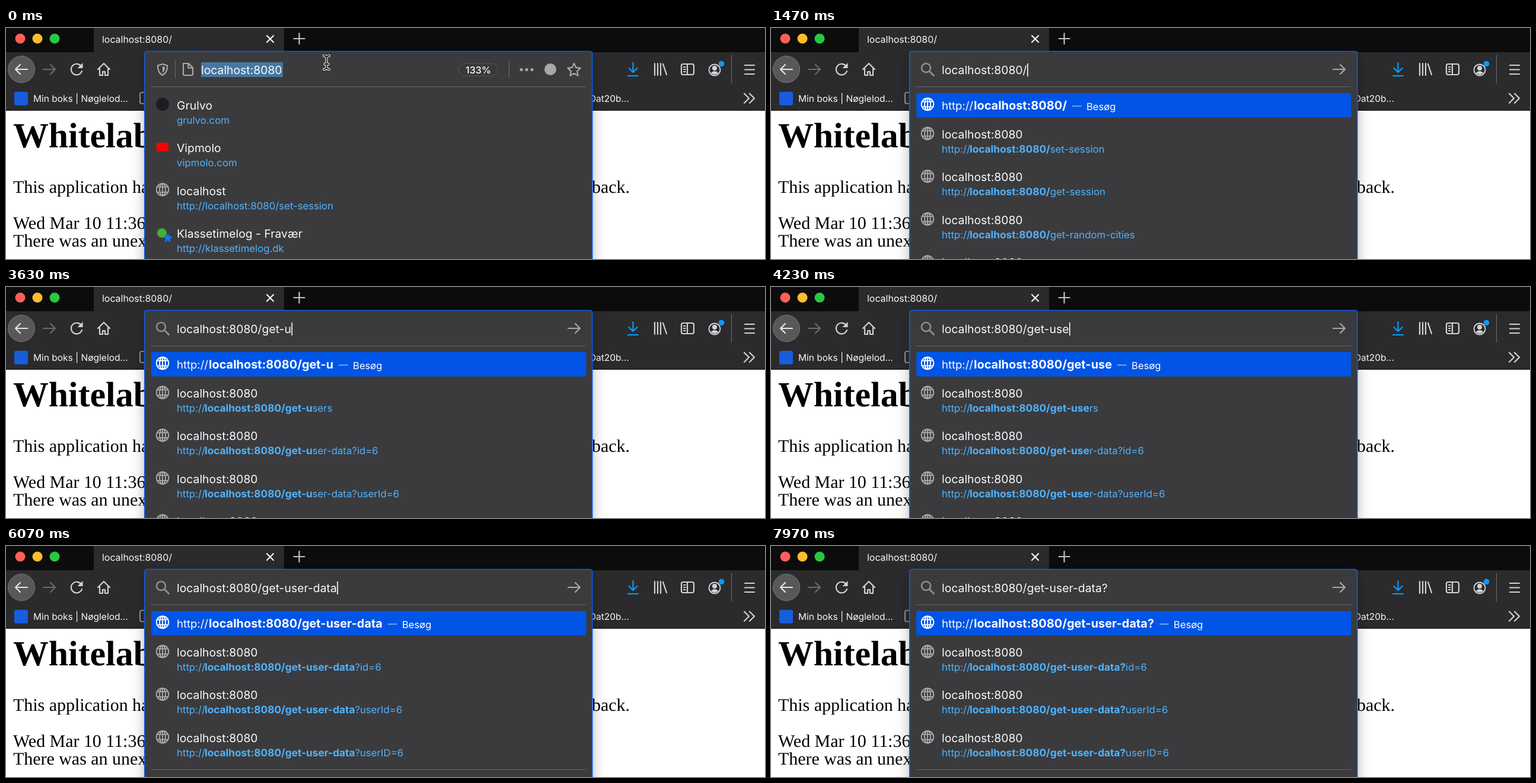
An HTML page for the animation above (8000 ms loop, 1280x391 px).

```html
<!DOCTYPE html>
<html lang="da">
<head>
<meta charset="utf-8">
<title>Address bar typing</title>
<style>
  html, body { margin: 0; width: 100%; height: 100%; overflow: hidden; background: #fff; }
  svg { display: block; }
  text { font: 19.35px Inter, "Open Sans", sans-serif; fill: #f9f9fa; white-space: pre; text-rendering: geometricPrecision; }
  .b { font-weight: 700; }
  .url { font-size: 16.75px; fill: #50b3ff; }
  .url .b { font-size: 17.25px; }
  .head { font-size: 19.95px; fill: #fff; }
  .visit { font-size: 16.6px; fill: #fff; }
  .mark { font-size: 15.5px; }
  .tab { font-size: 15.9px; }
  .zoom { font-size: 16.2px; font-weight: 500; }
  .page text { font: 29.93px "Liberation Serif", "Times New Roman", serif; fill: #000; }
  .page .h1 { font-size: 59.8px; font-weight: 700; }
  .line { fill: none; stroke: #d2d2d4; stroke-width: 2.2; stroke-linecap: round; stroke-linejoin: round; }
  .grey { stroke: #a8a8aa; }
  .dim { stroke: #6c6c6e; }
  .blue { stroke: #0a9bff; }
  .rule { fill: none; stroke: #66666a; stroke-width: 1.2; }
</style>
</head>
<body>
<svg width="1280" height="391" viewBox="0 0 1280 391">
  <defs>
    <filter id="shadow" x="-10%" y="-10%" width="120%" height="120%">
      <feDropShadow dx="0" dy="6" stdDeviation="11" flood-color="#000" flood-opacity=".28"/>
    </filter>
    <g id="globe" fill="none" stroke-width="1.9">
      <circle r="10.3"/>
      <ellipse rx="5" ry="10.3"/>
      <path d="M0-10V10M-9.2-4.4H9.2M-9.2 4.4H9.2"/>
    </g>
  </defs>

  <g class="page">
    <rect width="1280" height="391" fill="#fff"/>
    <text class="h1" x="12" y="201.5">Whitelabel Error Page</text>
    <text x="12" y="279">This application has no explicit mapping for /error, so you are seeing this as a fallback.</text>
    <text x="12" y="339.5">Wed Mar 10 11:36</text>
    <text x="12" y="370">There was an unexpected error</text>
  </g>

  <g id="chrome">
    <rect width="1280" height="42" fill="#0c0c0d"/>
    <rect y="41" width="1280" height="99" fill="#2b2b2d"/>
    <rect y="139" width="1280" height="1" fill="#0c0c0d"/>
    <rect x="148" width="321" height="42" fill="#2b2b2d"/>
    <circle cx="24" cy="18" r="8.5" fill="#ff5f57"/>
    <circle cx="53" cy="18" r="8.5" fill="#febc2e"/>
    <circle cx="82" cy="18" r="8.5" fill="#28c840"/>
    <text class="tab" x="162" y="25">localhost:8080/</text>
    <path class="line" d="M440 13l11 11m0-11l-11 11" style="stroke:#f4f4f5"/>
    <path class="line" d="M485.500 18h18m-9-9v18" style="stroke:#c4c4c6"/>

    <circle cx="26" cy="70" r="22.500" fill="#58585a" stroke="#77777a"/>
    <path class="line" d="M36 70H16m8-8l-8 8 8 8" style="stroke:#e6e6e8"/>
    <path class="line dim" d="M63 70h20m-8-8l8 8-8 8"/>
    <path class="line" d="M127 65A9.300 9.300 0 1 0 128 73"/>
    <path d="M129.500 59v9h-9z" fill="#d2d2d4"/>
    <path class="line" d="M155 70l10-10 10 10M158 69v11h5v-6h4v6h5V69"/>

    <path class="line blue" d="M1057.500 59v16m-7-7l7 7 7-7M1049 81h17"/>
    <path class="line" d="M1094 60v20m5-20v20m5-20v20m4-19l6 18"/>
    <rect class="line" x="1139" y="61" width="21" height="18" rx="3"/>
    <path class="line" d="M1149 61v18m-6-13h2.500m-2.500 4h2.500m-2.500 4h2.500"/>
    <circle class="line" cx="1195" cy="71" r="9.500" style="stroke-width:1.900"/>
    <circle cx="1195" cy="68" r="4" fill="#d2d2d4"/>
    <path d="M1188.500 76q6.500-6 13 0q-6.500 6-13 0" fill="#d2d2d4"/>
    <circle cx="1206.500" cy="60.500" r="4.800" fill="#0a9bff"/>
    <path class="rule" d="M1223.500 46v48"/>
    <path class="line" d="M1246 63h16m-16 7.500h16m-16 7.500h16"/>

    <rect x="14" y="108" width="23" height="23" rx="3" fill="#175ddc"/>
    <text class="mark" x="46" y="125">Min boks | Nøglelod...</text>
    <path class="line grey" d="M240 128h-11q-3 0-3-3v-13q0-3 3-3h5l3 4h6" style="stroke-width:1.700"/>
    <text class="mark" x="1051" y="125" text-anchor="end">Dat20b...</text>
    <path class="line" d="M1245 111l8 8-8 8m9-16l8 8-8 8"/>
  </g>

  <rect x="233.700" y="39.500" width="755" height="380" rx="4" fill="#3b3b3e" stroke="#0b5de0" stroke-width="1.600" filter="url(#shadow)"/>
  <path class="rule" d="M244 99.500H978"/>

  <g id="idle">
    <path class="line grey" d="M264 61l8 2.500q.5 12-8 16.500q-8.500-4.500-8-16.500z"/>
    <path d="M264 65v11q4-3 4-10z" fill="#a8a8aa"/>
    <path class="rule" d="M285.500 55v30M848.500 55v30"/>
    <path class="line grey" d="M299 60h9l7 7v11q0 2-2 2h-12q-2 0-2-2zM307.500 60v7.500h7"/>
    <rect id="selection" x="329" y="58" width="138" height="25" fill="#47779f"/>
    <text x="329" y="78">localhost:8080</text>
    <rect x="763.500" y="60" width="66" height="21" rx="10.500" fill="#39393c" stroke="#59595c"/>
    <text class="zoom" x="796.500" y="76.500" text-anchor="middle">133%</text>
    <g fill="#a8a8aa">
      <circle cx="869" cy="70.500" r="2.600"/><circle cx="878" cy="70.500" r="2.600"/><circle cx="887" cy="70.500" r="2.600"/>
      <circle cx="918" cy="70" r="10"/>
    </g>
    <path class="line grey" d="M958 60l3.200 6.900 7.500 1-5.500 5.200 1.400 7.500-6.600-3.700-6.600 3.700 1.400-7.500-5.500-5.200 7.500-1z"/>
    <g id="sites"></g>
    <circle cx="264" cy="129" r="11" fill="#1b1f23"/>
    <rect x="254" y="194" width="20" height="15" rx="3" fill="#f00"/>
    <use href="#globe" x="264" y="273.500" stroke="#a8a8aa"/>
    <circle cx="263" cy="347" r="8" fill="#3fae3c"/>
    <path d="M273 347.500l2.300 5 5.500.7-4 3.800 1 5.500-4.800-2.700-4.800 2.700 1-5.500-4-3.800 5.500-.7z" fill="#0a78ff"/>
    <g id="pointer" fill="none" stroke-linecap="round">
      <path id="beam" d="M536 47q4.500 0 4.500 4v15q0 4-4.500 4M545 47q-4.500 0-4.500 4M545 70q-4.500 0-4.500-4M537.500 61h6"/>
      <use href="#beam" stroke="#fff" stroke-width="4"/>
      <use href="#beam" stroke="#111" stroke-width="1.800"/>
    </g>
  </g>

  <g id="search" visibility="hidden">
    <circle class="line" cx="261.500" cy="67.500" r="7.500" style="stroke:#8e8e91;stroke-width:2.600"/>
    <path class="line" d="M267.500 73.500l7 7" style="stroke:#8e8e91;stroke-width:3"/>
    <path class="line grey" d="M948 70h20m-8-8l8 8-8 8"/>
    <text id="input" x="288" y="78"></text>
    <rect x="245" y="110" width="733.500" height="41.500" rx="3" fill="#0055e6"/>
    <use href="#globe" x="264" y="129" stroke="#fff"/>
    <text x="288" y="138" style="fill:#fff;font-size:18.500px">http://</text>
    <text id="head" class="head b" x="342" y="138"></text>
    <rect id="dash" y="131.500" width="15.500" height="1.500" fill="#8fb8f6"/>
    <text id="visit" class="visit" y="139">Besøg</text>
    <g id="rows"></g>
    <path id="end" class="rule" d="M244 378.500H978"/>
  </g>
  <rect id="caret" y="60" width="1.600" height="22" fill="#fff"/>
</svg>
<script>
const LOOP = 8000, LAG = 150, BLINK = 500, PITCH = 72.4;
const HOST = 'localhost:8080', PATH = '/get-user-data?';
// Moment the selection collapses to a caret
const DESELECT = 100;
// Press time of each character in PATH
const KEYS = [1050, 1900, 2080, 2250, 2800, 3300, 3650, 3900, 4450, 4800, 5250, 5450, 5620, 5780, 6400];
const DATA = ['/get-user-data?id=6', '/get-user-data?userId=6', '/get-user-data?userID=6'];
// Suggestions by smallest typed length
const LISTS = [
  [10, DATA],
  [6, ['/get-users', DATA[0], DATA[1]]],
  [2, ['/get-session', '/get-random-cities', '/get-session-data']],
  [1, ['/set-session', '/get-session', '/get-random-cities']]
];
const SITES = [
  ['Grulvo', 'grulvo.com'],
  ['Vipmolo', 'vipmolo.com'],
  ['localhost', 'http://localhost:8080/set-session'],
  ['Klassetimelog - Fravær', 'http://klassetimelog.dk']
];

const $ = id => document.getElementById(id);
const show = (id, on) => $(id).setAttribute('visibility', on ? 'inherit' : 'hidden');
const setX = (id, x) => $(id).setAttribute('x', x);
const typedAt = t => KEYS.filter(k => k <= t).length;

function row(title, url, y) {
  return `<text x="288" y="${y}">${title}</text><text class="url" x="288" y="${y + 24}">${url}</text>`;
}

function suggestion(path, i, len) {
  const url = `http://<tspan class="b" x="335">${HOST}${path.slice(0, len)}</tspan>${path.slice(len)}`;
  return `<use href="#globe" x="264" y="${178.5 + i * PITCH}" stroke="#a8a8aa"/>` + row(HOST, url, 187 + i * PITCH);
}

function drawInput(len) {
  const text = HOST + PATH.slice(0, len);
  $('input').textContent = $('head').textContent = text;
  setX('caret', (len ? 288.5 : 329.5) + $('input').getComputedTextLength());
  const end = 342 + $('head').getComputedTextLength();
  setX('dash', end + 9);
  setX('visit', end + 33);
}

function drawRows(len) {
  const list = LISTS.find(([min]) => len >= min)[1];
  const full = len >= 14;
  const paths = full ? list : [...list, '/get-user-data'];
  $('rows').innerHTML = paths.map((p, i) => suggestion(p, i, len)).join('');
  show('end', full);
}

$('sites').innerHTML = SITES.map(([name, url], i) => row(name, url, 138 + i * PITCH)).join('');

let inputLen = -1, rowsLen = -1;
function render(t) {
  const len = typedAt(t), matched = Math.max(1, typedAt(t - LAG));
  show('idle', !len);
  show('search', len);
  show('selection', !len && t < DESELECT);
  show('pointer', !len && t < DESELECT);
  if (len !== inputLen) drawInput(inputLen = len);
  if (matched !== rowsLen) drawRows(rowsLen = matched);
  const since = t - (len ? KEYS[len - 1] : DESELECT);
  show('caret', since >= 0 && since % (2 * BLINK) < BLINK);
}

const start = performance.now();
function tick() {
  render((performance.now() - start) % LOOP);
  requestAnimationFrame(tick);
}
tick();
</script>
</body>
</html>
```
